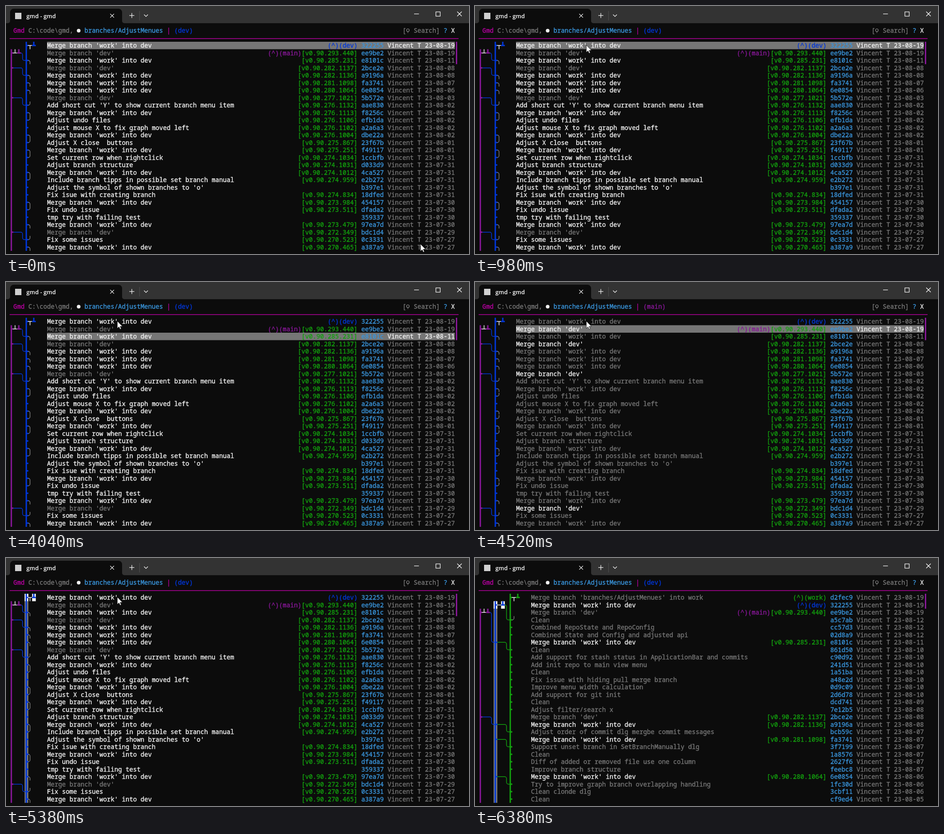
Recreate the animation shown at these times as an HTML page with a canvas. Size 1021 by 548 pixels, loop 8 s.

```html
<!DOCTYPE html>
<html lang="en">
<head>
<meta charset="utf-8">
<title>gmd</title>
<style>
html, body { margin: 0; width: 100%; height: 100%; overflow: hidden; background: #0c0c0c; }
canvas { display: block; width: 1021px; height: 548px; }
</style>
</head>
<body>
<canvas id="stage"></canvas>
<script>
const W = 1021, H = 548, LOOP = 8000;
const CW = 8.25, RH = 16.5, LEFT = 8, TOP = 79, ROWS = 28;
const BG = '#0c0c0c', WHITE = '#f2f2f2', GREY = '#767676', BLUE = '#0037da', CYAN = '#3a96dd',
      GREEN = '#13a10e', PURPLE = '#881798', MAGENTA = '#b4009e';
const MONO = '500 13.75px "Noto Sans Mono", "DejaVu Sans Mono", monospace';
const AUTHOR = 'Vincent T';

const canvas = document.getElementById('stage');
const ctx = canvas.getContext('2d');
const ratio = window.devicePixelRatio || 1;
canvas.width = W * ratio;
canvas.height = H * ratio;

// branch (d: dev, m: main, w: work), hash, date, version, message
const parse = src => src.trim().split('\n').map(line => {
  const [branch, hash, date, version, ...words] = line.split(' ');
  return { branch, hash, date: '23-' + date, version, message: words.join(' ') };
});

const folded = parse(`
d 322255 08-19 - Merge branch 'work' into dev
m ee9be2 08-19 293.440 Merge branch 'dev'
d e8101c 08-11 285.231 Merge branch 'work' into dev
m 2bce2e 08-08 282.1137 Merge branch 'dev'
d a9196a 08-08 282.1136 Merge branch 'work' into dev
d fa3741 08-07 281.1098 Merge branch 'work' into dev
d 6e0854 08-06 280.1064 Merge branch 'work' into dev
m 5b572e 08-03 277.1021 Merge branch 'dev'
d aae830 08-02 276.1132 Add short cut 'Y' to show current branch menu item
d f8256c 08-02 276.1113 Merge branch 'work' into dev
d efb1da 08-02 276.1106 Adjust undo files
d a2a6a3 08-02 276.1102 Adjust mouse X to fix graph moved left
d dbe22a 08-02 276.1004 Merge branch 'work' into dev
d 23f67b 08-01 275.867 Adjust X close  buttons
d f49117 08-01 275.251 Merge branch 'work' into dev
d 1ccbfb 07-31 274.1034 Set current row when rightclick
d d033d9 07-31 274.1031 Adjust branch structure
d 4ca527 07-31 274.1012 Merge branch 'work' into dev
d e2b272 07-31 274.959 Include branch tipps in possible set branch manual
d b397e1 07-31 - Adjust the symbol of shown branches to 'o'
d 18dfed 07-31 274.834 Fix isue with creating branch
d 454157 07-30 273.984 Merge branch 'work' into dev
d dfada2 07-30 273.511 Fix undo issue
d 359337 07-30 - tmp try with failing test
d 97ea7d 07-30 273.479 Merge branch 'work' into dev
m bdc1d4 07-29 272.349 Merge branch 'dev'
d 0c3331 07-27 270.523 Fix some issues
d a387a9 07-27 270.465 Merge branch 'work' into dev`);

const unfolded = parse(`
w d2fec9 08-19 - Merge branch 'branches/AdjustMenues' into work
d 322255 08-19 - Merge branch 'work' into dev
m ee9be2 08-19 293.440 Merge branch 'dev'
w a5c7ab 08-12 - Clean
w cc57d3 08-12 - Combined RepoState and RepoConfig
w 02d8a9 08-12 - Combined State and Config and adjusted api
d e8101c 08-11 285.231 Merge branch 'work' into dev
w 861d50 08-10 - Clean
w c90d92 08-10 - Add support for stash status in ApplicationBar and commits
w 241d51 08-10 - Add init repo to main view menu
w 1a51ba 08-10 - Clean
w a48e2d 08-10 - Fix issue with hiding pull merge branch
w 0d9c09 08-10 - Improve menu width calculation
w 2d6d78 08-10 - Add support for git init
w dcd741 08-09 - Clean
w 7e12b5 08-08 - Adjust filter/search x
m 2bce2e 08-08 282.1137 Merge branch 'dev'
d a9196a 08-08 282.1136 Merge branch 'work' into dev
w bcb59c 08-07 - Adjust order of commit dlg mergbe commit messages
d fa3741 08-07 281.1098 Merge branch 'work' into dev
w 3f7199 08-07 - Support unset branch in SetBranchManually dlg
w 1a8576 08-07 - Clean
w 2627f6 08-07 - Diff of added or removed file use one column
w feebc8 08-07 - Improve branch structure
d 6e0854 08-06 280.1064 Merge branch 'work' into dev
w 1fc30d 08-06 - Try to improve graph branch overlapping handling
w 3cbf11 08-06 - Clean clonde dlg
w cf9ed4 08-05 - Clean`);

const refs = {
  d2fec9: ['(^)(work)', GREEN],
  '322255': ['(^)(dev)', BLUE],
  ee9be2: ['(^)(main)', PURPLE]
};
const lanes = { m: [0, PURPLE], d: [4, BLUE], w: [8, GREEN] };

const colX = c => LEFT + CW * c;
const midX = c => colX(c) + 3.75; // vertical strokes sit a little left of the cell centre
const rowY = r => TOP + RH * r;
const midY = r => rowY(r + 0.5);

function rect(x0, y0, x1, y1, color) {
  ctx.fillStyle = color;
  ctx.fillRect(x0, y0, x1 - x0, y1 - y0);
}

// A hairline outline gives the terminal font its sturdier weight
function text(str, col, row, color) {
  const x = colX(col), y = midY(row) + 4.9;
  ctx.font = MONO;
  ctx.fillStyle = ctx.strokeStyle = color;
  ctx.lineWidth = 0.4;
  ctx.lineJoin = 'round';
  ctx.fillText(str, x, y);
  ctx.strokeText(str, x, y);
  ctx.lineJoin = 'miter';
}

function stroke(color, width, ...points) {
  ctx.strokeStyle = color;
  ctx.lineWidth = width;
  ctx.beginPath();
  points.forEach(([x, y], i) => i ? ctx.lineTo(x, y) : ctx.moveTo(x, y));
  ctx.stroke();
}

function titleBar() {
  rect(0, 0, W, 38, '#333333');
  ctx.fillStyle = BG;
  ctx.beginPath();
  ctx.moveTo(4, 38);
  ctx.arcTo(9, 38, 9, 30, 5);
  ctx.arcTo(9, 6, 20, 6, 8);
  ctx.arcTo(256, 6, 256, 16, 8);
  ctx.arcTo(256, 38, 262, 38, 5);
  ctx.lineTo(262, 38);
  ctx.fill();
  rect(20, 15, 34, 29, '#d0d0d0');
  ctx.font = '600 12.7px "Open Sans", "Noto Sans", sans-serif';
  ctx.fillStyle = '#ffffff';
  ctx.fillText('gmd - gmd', 45, 26.5);

  const cross = (x, y, s) => {
    stroke('#ffffff', 1.2, [x - s, y - s], [x + s, y + s]);
    stroke('#ffffff', 1.2, [x - s, y + s], [x + s, y - s]);
  };
  cross(234, 21.5, 4.2);
  stroke('#ffffff', 1.2, [272, 21], [283, 21]);
  stroke('#ffffff', 1.2, [277.5, 15.5], [277.5, 26.5]);
  stroke('#505050', 1, [294.5, 11], [294.5, 32]);
  stroke('#ffffff', 1.2, [304.5, 19], [308.7, 23.2], [312.9, 19]);
  stroke('#ffffff', 1.2, [900, 17.5], [910.5, 17.5]);
  ctx.strokeRect(948, 13, 9.5, 9.5);
  cross(1000, 17.5, 5);
}

function header(onMain) {
  text('Gmd', 1, -2, MAGENTA);
  text('C:\\code\\gmd,', 5, -2, GREY);
  ctx.fillStyle = WHITE;
  ctx.beginPath();
  ctx.arc(midX(18), 54.5, 4, 0, 7);
  ctx.fill();
  text('branches/AdjustMenues', 20, -2, CYAN);
  text('|', 42, -2, MAGENTA);
  text(onMain ? '(main)' : '(dev)', 44, -2, onMain ? PURPLE : BLUE);
  text('[  Search]', 105, -2, GREY);
  ctx.strokeStyle = '#909090';
  ctx.lineWidth = 1.1;
  ctx.beginPath();
  ctx.arc(midX(106), 53.5, 3, 0, 7);
  ctx.stroke();
  stroke('#909090', 1.1, [midX(106), 56.5], [midX(106), 59.5]);
  text('?', 116, -2, CYAN);
  text('X', 118, -2, WHITE);
  stroke(MAGENTA, 1.6, [LEFT, 72], [colX(120), 72]);
}

function commits(list, col, bright, selected) {
  list.forEach((c, r) => {
    const active = r === selected;
    if (active) rect(colX(col), rowY(r), colX(119), rowY(r + 1), GREY);
    text(c.message, col, r, active || c.branch === bright ? WHITE : GREY);
    let end = 93;
    if (c.version !== '-') {
      const tag = `[v0.90.${c.version}]`;
      end -= tag.length;
      text(tag, end, r, GREEN);
    }
    if (refs[c.hash]) {
      const [name, color] = refs[c.hash];
      text(name, end - name.length, r, color);
    }
    text(c.hash, 94, r, CYAN);
    text(AUTHOR, 101, r, active ? WHITE : GREY);
    text(c.date, 111, r, active ? WHITE : GREY);
  });
}

// Thick branch line with a nub at each of its commits
function lane(list, branch) {
  const [col, color] = lanes[branch];
  const first = list.findIndex(c => c.branch === branch);
  const x = midX(col);
  rect(x - 1.5, rowY(first), x + 1.5, rowY(ROWS), color);
  list.forEach((c, r) => {
    if (c.branch === branch) rect(x, midY(r) - 1.5, colX(col + 1), midY(r) + 1.5, color);
  });
}

// stem: -1 points up, 1 down, 0 none
function tip(branch, row, stem) {
  const [col, color] = lanes[branch];
  const y = midY(row), x = midX(col + 2);
  stroke(WHITE, 1.5, [colX(col + 1) - 1, y], [colX(col + 2), y]);
  if (stem) stroke(WHITE, 1.5, [midX(col + 1), y], [midX(col + 1), y + stem * RH / 2]);
  rect(x - 1.5, rowY(row), x + 1.5, y, color);
  rect(colX(col + 2), y - 1.5, colX(col + 3), y + 1.5, color);
}

// Thin line right, down and right again into the next lane
function link(from, col, r0, r1, color) {
  const x = midX(col), y0 = midY(r0), y1 = midY(r1), end = midX(col + 1);
  ctx.strokeStyle = color;
  ctx.lineWidth = 1.5;
  ctx.beginPath();
  ctx.moveTo(colX(from), y0);
  ctx.arcTo(x, y0, x, y1, 4);
  ctx.arcTo(x, y1, end, y1, 4);
  ctx.lineTo(end, y1);
  ctx.stroke();
}

function hook(col, row, dir, gap) {
  const x = midX(col), y = midY(row);
  ctx.strokeStyle = '#8a8a8a';
  ctx.lineWidth = 1.3;
  ctx.beginPath();
  ctx.moveTo(colX(col), y);
  ctx.arcTo(x, y, x, y + dir * RH / 2, 4);
  ctx.lineTo(x, y + dir * (RH / 2 - gap));
  ctx.stroke();
}

function laneHighlight(row) {
  rect(colX(4), rowY(row), colX(5), rowY(ROWS), GREY);
  rect(colX(4), rowY(row), colX(5), rowY(row + 1), WHITE);
  rect(colX(6), rowY(row), colX(7), rowY(row + 1), WHITE);
}

function foldedGraph(onBranch, gap) {
  if (onBranch) laneHighlight(0);
  [[3, 1], [1, 3], [1, 7], [1, 25]].forEach(([from, r]) => link(from, 3, r, r + 1, BLUE));
  lane(folded, 'm');
  lane(folded, 'd');
  tip('d', 0, 1);
  tip('m', 1, -1);
  [2, 4, 5, 6, 9, 12, 14, 17, 21, 24, 27].forEach(r => hook(5, r, 1, gap));
  [8, 10, 13, 15, 18, 22, 26].forEach(r => hook(5, r, -1, gap));
}

function unfoldedGraph() {
  laneHighlight(1);
  link(3, 3, 2, 6, BLUE);
  link(1, 3, 16, 17, BLUE);
  link(7, 7, 1, 3, GREEN);
  [6, 17, 19, 24].forEach(r => link(5, 7, r, r + 1, GREEN));
  'mdw'.split('').forEach(b => lane(unfolded, b));
  tip('w', 0, 1);
  tip('d', 1, 0);
  tip('m', 2, -1);
  hook(9, 3, -1, 0);
}

const pointerSteps = [
  [0, 914, 526], [70, 720, 400], [127, 490, 245], [183, 318, 125], [240, 257.5, 77.5],
  [440, 253, 80], [510, 248, 84], [580, 245.5, 86.5]
];

function pointer(t) {
  const [, x, y] = pointerSteps.filter(s => s[0] <= t).pop();
  const shape = [[0, 0], [0, 16], [3.7, 12.6], [6.2, 18], [8.6, 17], [6.2, 11.6], [11.3, 11.6]];
  ctx.beginPath();
  shape.forEach(([dx, dy]) => ctx.lineTo(x + dx, y + dy));
  ctx.closePath();
  ctx.fillStyle = '#ffffff';
  ctx.fill();
  ctx.strokeStyle = '#000000';
  ctx.lineWidth = 0.7;
  ctx.stroke();
}

const selections = [[0, 0], [2700, 1], [4040, 2], [4520, 1], [4980, 0], [5380, -1]];

function draw(t) {
  ctx.setTransform(ratio, 0, 0, ratio, 0, 0);
  rect(0, 0, W, H, BG);
  titleBar();
  const open = t >= 6380;
  const selected = selections.filter(s => s[0] <= t).pop()[1];
  const onMain = selected === 1;
  header(onMain);
  if (open) {
    unfoldedGraph();
    commits(unfolded, 14, 'd', -1);
  } else {
    foldedGraph(selected < 0, onMain ? 1 : 0);
    commits(folded, 10, onMain ? 'm' : 'd', selected);
  }
  rect(midX(119) - 1.5, TOP, midX(119) + 1.5, rowY(open ? 2 : 3), PURPLE);
  if (t < 6310) pointer(t);
}

const start = performance.now();
function tick() {
  draw((performance.now() - start) % LOOP);
  requestAnimationFrame(tick);
}
tick();
</script>
</body>
</html>
```
